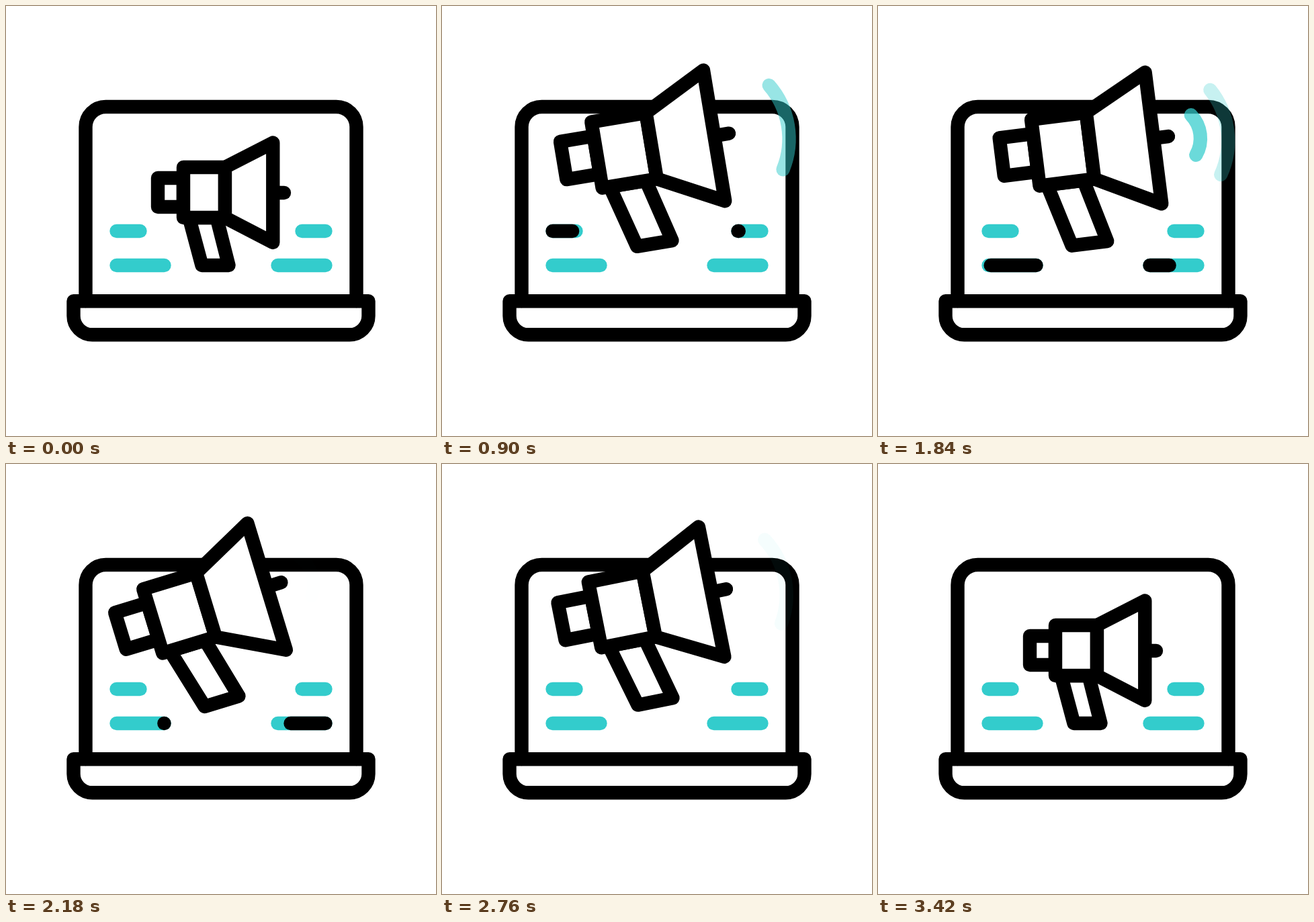
Recreate the animation shown at these times as an HTML page with a canvas. Size 640 by 640 pixels, loop 3600 ms.

```html
<!DOCTYPE html>
<html>
<head>
<meta charset="utf-8">
<style>
html, body { margin: 0; width: 100%; height: 100%; overflow: hidden; background: #fff; }
canvas { display: block; }
</style>
</head>
<body>
<canvas id="stage" width="640" height="640"></canvas>
<script>
const ctx = document.getElementById('stage').getContext('2d');
const LOOP = 3600, LINE = 20.4, TEAL = '#33cccc', RAD = Math.PI / 180;
const LEFT = 164.5, RIGHT = 475.5;
const SWING_START = 640, SWING_PERIOD = 778, SWINGS = 3;
const PULSE_START = 410, PULSE_PERIOD = 590, PULSES = 5;

const clamp = u => Math.min(1, Math.max(0, u));
const tent = x => Math.max(0, 1 - Math.abs(x));

// Eased progress from 0 to 1, starting at `start` and lasting `span`
function ease(t, start, span) {
  const u = clamp((t - start) / span);
  return u * u * (3 - 2 * u);
}

function line(x1, x2, y, color) {
  ctx.strokeStyle = color;
  ctx.beginPath();
  ctx.moveTo(x1, y);
  ctx.lineTo(Math.max(x2, x1 + 0.01), y);
  ctx.stroke();
}

// Four-sided shape with two horizontal or two vertical sides
function quad(...points) {
  ctx.beginPath();
  points.forEach(([x, y]) => ctx.lineTo(x, y));
  ctx.closePath();
  ctx.fill();
  ctx.stroke();
}

const box = (x1, y1, x2, y2) => quad([x1, y1], [x2, y1], [x2, y2], [x1, y2]);

function drawLaptop() {
  ctx.strokeStyle = '#000';
  ctx.beginPath();
  ctx.moveTo(118.5, 439);
  ctx.arcTo(118.5, 150, 320, 150, 30);
  ctx.arcTo(521.5, 150, 521.5, 439, 30);
  ctx.lineTo(521.5, 439);
  ctx.stroke();
  ctx.beginPath();
  ctx.roundRect(100.5, 439.3, 439, 50, [0, 0, 28, 28]);
  ctx.stroke();
}

// A stripe with a dark sweep that runs along it once
function drawStripe(t, x, length, y, start) {
  const head = ease(t, start, 400), tail = ease(t, start + 380, 400);
  line(x, x + length, y, TEAL);
  if (head > 0 && tail < 1) line(x + length * tail, x + length * head, y, '#000');
}

function drawStripes(t) {
  for (let row = 0; row < 2; row++) {
    const length = 35 + 36 * row, y = 335 + 51 * row, start = 600 + 810 * row;
    drawStripe(t, LEFT, length, y, start);
    drawStripe(t, RIGHT - length, length, y, start + 255);
  }
}

function drawMegaphone(scale) {
  ctx.save();
  ctx.scale(scale, scale);
  ctx.translate(-316.5, -359);
  ctx.lineWidth = LINE / scale;
  ctx.fillStyle = '#fff';
  line(397, 414, 278, '#000');
  quad([272.5, 315], [291.5, 386], [331.5, 386], [313.5, 315]);
  box(226, 256, 264, 299);
  box(264, 240, 326, 315);
  quad([326, 240], [397.3, 203.5], [397.3, 352], [326, 315]);
  ctx.restore();
}

function drawWave(x, y, radius, halfHeight, alpha) {
  const angle = Math.asin(halfHeight / radius);
  ctx.globalAlpha = alpha;
  ctx.strokeStyle = TEAL;
  ctx.beginPath();
  ctx.arc(x - radius * Math.cos(angle), y, radius, -angle, angle);
  ctx.stroke();
  ctx.globalAlpha = 1;
}

function drawWaves(t, scale) {
  const since = t - PULSE_START;
  if (since < 0 || since >= PULSE_PERIOD * PULSES) return;
  const age = 3 * (since % PULSE_PERIOD) / PULSE_PERIOD;
  const x = 127 + 55 * scale, y = -79 * scale;
  drawWave(x - 33, y, 50, 30, tent(age - 1));
  drawWave(x, y, 121, 63.5, tent(age - 2));
}

function draw(t) {
  const lift = ease(t, 210, 430) * (1 - ease(t, 2990, 420));
  const hop = ease(t, 3000, 190) * (1 - ease(t, 3190, 230));
  const turns = SWINGS * clamp((t - SWING_START) / (SWING_PERIOD * SWINGS));
  const swing = 12 + 5 * Math.cos(turns * 2 * Math.PI);
  const scale = 1 + 0.328 * lift;

  ctx.clearRect(0, 0, 640, 640);
  ctx.save();
  ctx.lineWidth = LINE;
  ctx.lineCap = ctx.lineJoin = 'round';

  ctx.translate(320 - 31 * hop, 320 - 44 * hop);
  ctx.rotate(-5.6 * hop * RAD);
  ctx.translate(-320, -320);
  drawLaptop();
  drawStripes(t);

  ctx.translate(316.5 + 0.5 * lift, 359 - 42 * lift);
  ctx.rotate(-swing * lift * RAD);
  drawMegaphone(scale);
  drawWaves(t, scale);
  ctx.restore();
}

const begin = performance.now();
function tick() {
  draw((performance.now() - begin) % LOOP);
  requestAnimationFrame(tick);
}
tick();
</script>
</body>
</html>
```
